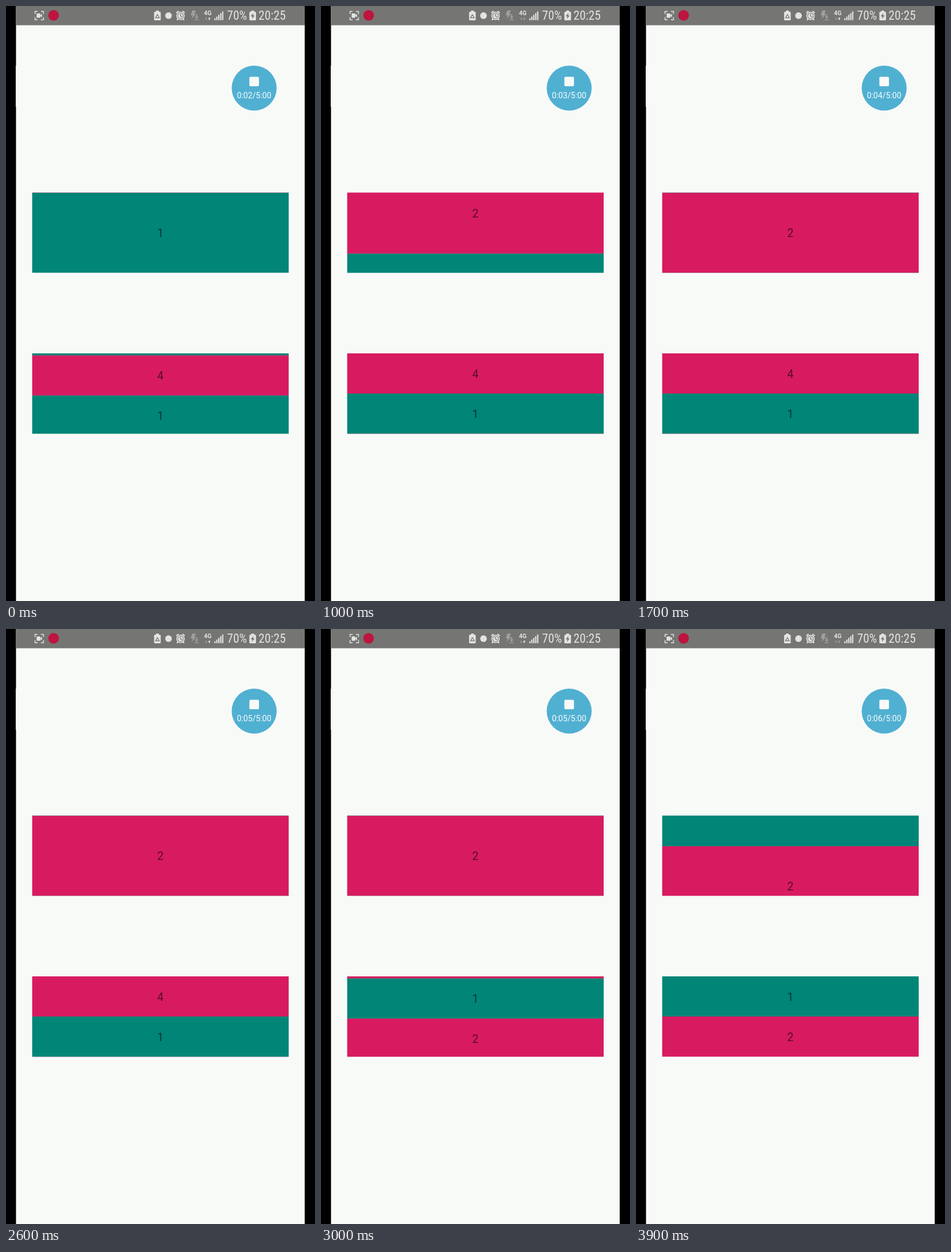
An HTML page with a canvas that plays this animation: 540 px wide and 1038 px high, repeating every 4 s.

```html
<!DOCTYPE html>
<html lang="en">
<head>
<meta charset="utf-8">
<title>Flipping rows</title>
<style>
  html, body { margin: 0; width: 100%; height: 100%; overflow: hidden; background: #000; }
  canvas { display: block; width: 540px; height: 1038px; }
</style>
</head>
<body>
<canvas id="stage" width="540" height="1038"></canvas>
<script>
const ctx = document.getElementById('stage').getContext('2d');
const LOOP = 4000, STEP = 100, FLIP = 449;
const GREEN = '#008577', PINK = '#d81b60', PAPER = '#f8faf8';
const BAR = '#757673', LIGHT = '#e2e4e1', DIM = '#a0a19e';
const LEFT = 45.5, WIDTH = 448.5;

function rect(x, y, w, h, color) {
  ctx.fillStyle = color;
  ctx.fillRect(x, y, w, h);
}

function round(x, y, w, h, r, color) {
  ctx.fillStyle = color;
  ctx.beginPath();
  ctx.roundRect(x, y, w, h, r);
  ctx.fill();
}

function disc(x, y, r, color) {
  ctx.fillStyle = color;
  ctx.beginPath();
  ctx.arc(x, y, r, 0, Math.PI * 2);
  ctx.fill();
}

function trace(points) {
  ctx.beginPath();
  for (let i = 0; i < points.length; i += 2) ctx.lineTo(points[i], points[i + 1]);
}

function poly(points, color) {
  trace(points);
  ctx.fillStyle = color;
  ctx.fill();
}

function line(points, color, width) {
  trace(points);
  ctx.strokeStyle = color;
  ctx.lineWidth = width;
  ctx.stroke();
}

function text(str, x, y, font, color, align = 'center') {
  ctx.font = font;
  ctx.fillStyle = color;
  ctx.textAlign = align;
  ctx.fillText(str, x, y);
}

// Condensed face if present, otherwise a smaller regular one.
const CONDENSED = '"Roboto Condensed", Roboto, sans-serif';
ctx.font = `condensed 21.5px ${CONDENSED}`;
const barFont = ctx.measureText('20:25').width < 50
  ? `condensed 21.5px ${CONDENSED}` : '19px Roboto, sans-serif';

// Smooth start and stop, 0 to 1.
function flip(t, start) {
  const x = Math.min(1, Math.max(0, (t - start) / FLIP));
  return (1 - Math.cos(Math.PI * x)) / 2;
}

function row(n, y, h) {
  rect(LEFT, y, WIDTH, h + 0.3, n % 2 ? GREEN : PINK);
  text(n, 269.8, y + h / 2 + 7.6, '19.6px Roboto, sans-serif', 'rgba(0,0,0,0.6)');
}

function windowed(y, draw) {
  ctx.save();
  ctx.beginPath();
  ctx.rect(LEFT, y, WIDTH, 140.2);
  ctx.clip();
  draw(y);
  ctx.restore();
}

function battery(x) {
  round(x, 10, 11.6, 15, 1.5, LIGHT);
  rect(x + 3.3, 8, 5, 2.5, LIGHT);
}

function recorder() {
  for (const [x, dx] of [[50.7, 4.5], [65.5, -4.5]])
    for (const [y, dy] of [[9.5, 4.5], [24, -4.5]])
      line([x + dx, y, x, y, x, y + dy], LIGHT, 1.5);
  round(53.5, 13, 6.6, 7.6, 1, LIGHT);
  poly([59.5, 16.8, 63, 13.6, 63, 20], LIGHT);
}

function alarm() {
  disc(305, 17.3, 7.3, LIGHT);
  line([297.6, 12, 301.5, 8.7], LIGHT, 2);
  line([308.5, 8.7, 312.4, 12], LIGHT, 2);
  line([300.5, 22.5, 298.7, 24.7], LIGHT, 2);
  line([309.5, 22.5, 311.3, 24.7], LIGHT, 2);
  ctx.beginPath();
  ctx.arc(305, 17.3, 5, 0, Math.PI * 2);
  ctx.strokeStyle = BAR;
  ctx.lineWidth = 1.1;
  ctx.stroke();
  line([305, 13.8, 305, 17.6, 307.8, 18.8], BAR, 1.3);
}

function statusBar(t) {
  rect(17.5, 0, 504.5, 33.6, BAR);
  recorder();
  disc(83.2, 16.3, 9.3, '#bd1540');

  battery(258.8);
  line([264.6, 14.8, 267.8, 20.6, 261.4, 20.6, 264.6, 14.8], BAR, 1.3);
  disc(284, 16.8, 5.8, LIGHT);
  alarm();

  poly([325.5, 8, 332, 8, 329, 13.5, 332.3, 13.5, 324, 23, 326.5, 16.2, 322.8, 16.2], DIM);
  rect(332.2, 14.5, 2, 4.5, DIM);
  poly([329.8, 18.5, 336.6, 18.5, 333.2, 22.2], DIM);
  rect(329.6, 23, 7.2, 1.5, DIM);

  text('4G', 352.6, 16, 'bold 10.5px Roboto, sans-serif', LIGHT);
  const idle = (t >= 900 && t < 1300) || t >= 3600;
  rect(349.3, 20, 1.2, 3, DIM);
  poly([348, 22, 351.8, 22, 349.9, 24.6], DIM);
  const up = idle ? DIM : LIGHT;
  rect(354.6, 21.5, 1.4, 3, up);
  poly([353.2, 22.4, 357.4, 22.4, 355.3, 19.5], up);

  for (let i = 0; i < 5; i++) {
    const h = 3.2 + i * 3;
    rect(364 + i * 3.4, 24.7 - h, 2.2, h, LIGHT);
  }

  text('70%', 386.3, 24.3, barFont, LIGHT, 'left');
  battery(425.3);
  poly([432.6, 12, 427.6, 18, 430.6, 18, 429.6, 22.6, 434.6, 16.4, 431.6, 16.4], BAR);
  text('20:25', 488.8, 24.3, barFont, LIGHT, 'right');
}

function recordButton(t) {
  disc(433.7, 143.2, 39.3, '#50b0d2');
  round(425.3, 123.5, 16.8, 16.6, 2, PAPER);
  const sec = 2 + Math.floor((t + 400) / 1000);
  text(`0:0${sec}/5:00`, 433.6, 161, '14.1px Roboto, sans-serif', '#fafcfc');
}

function draw(t) {
  rect(0, 0, 540, 1038, '#000');
  rect(17.5, 0, 504.5, 1038, PAPER);
  rect(17, 104, 1, 72, PAPER);
  statusBar(t);
  recordButton(t);

  // One tall row, flipping downwards.
  const down = flip(t, 698) + flip(t, 3710);
  windowed(325.4, y => {
    for (let i = 0; i < 3; i++) row(i + 1, y + (down - i) * 140, 140);
  });

  // Two short rows, scrolling upwards.
  const up = flip(t, -384) + flip(t, 2616);
  windowed(606, y => {
    [3, 4, 1, 2].forEach((n, i) => row(n, y + (i - up) * 70, 70));
  });
}

const begin = performance.now();
function frame() {
  const t = (performance.now() - begin) % LOOP;
  draw(Math.floor(t / STEP) * STEP);
  requestAnimationFrame(frame);
}
frame();
</script>
</body>
</html>
```
